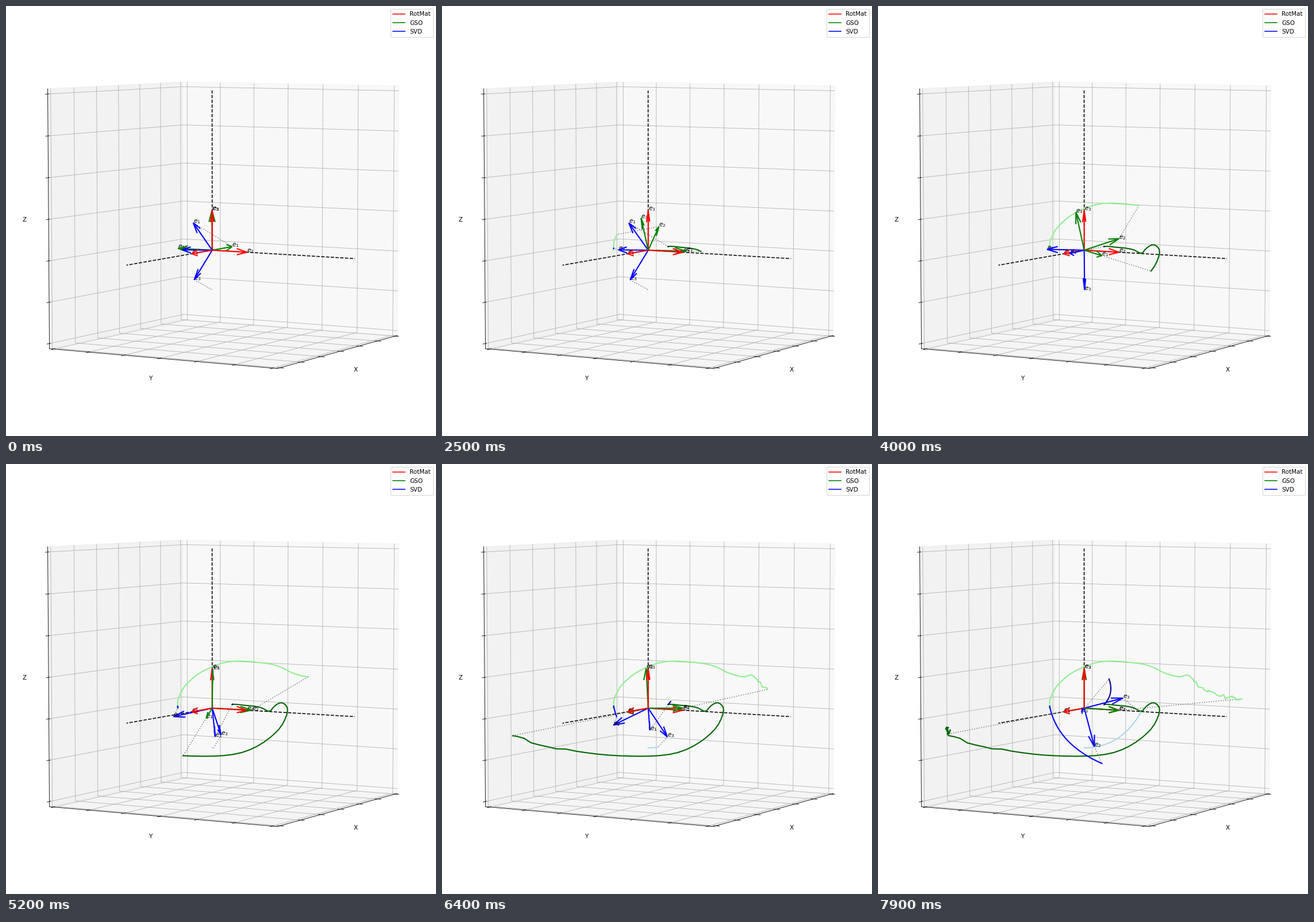
A matplotlib script that plays this animation: 748 by 748 pixels, repeating every 8000 ms.

```python
import numpy as np
import matplotlib.pyplot as plt
from matplotlib.animation import FuncAnimation
from matplotlib.lines import Line2D

SIZE, INCHES = 748, 10
FRAMES, INTERVAL = 80, 100
ELEV, AZIM = 5, 30
LOW, HIGH = -2.125, 4.125
STEPS = np.arange(FRAMES)

# Camera of the 3D axes: screen basis, scale and centre in pixels
el, az = np.radians([ELEV, AZIM])
RIGHT = np.array([-np.sin(az), np.cos(az), 0])
VIEW = np.array([np.cos(el) * np.cos(az), np.cos(el) * np.sin(az), np.sin(el)])
BASIS = np.column_stack([RIGHT, np.cross(VIEW, RIGHT), VIEW])
UNIT = 1.8294640721620434 * 25 / 24 / np.sqrt(3) / (HIGH - LOW)
SCALE = SIZE / 0.185 * UNIT
CX, CY = SIZE * 0.095 / 0.185, SIZE * 0.09 / 0.185
MID = BASIS.T @ np.full(3, (LOW + HIGH) / 2)


def to_world(x, y, depth):
    """World points seen at screen pixels (x, y), depth towards the viewer."""
    far = (10 + UNIT * (MID[2] - depth)) / SCALE
    local = np.array([MID[0] + (x - CX) * far, MID[1] + (CY - y) * far, depth])
    return (BASIS @ local).T


def glide(keys):
    """Cubic Hermite motion through rows of (time, values...), from rest."""
    keys = np.array(keys, float)
    t, p = keys[:, 0], keys[:, 1:]
    slope = np.gradient(p, t, axis=0)
    slope[0] = 0
    k = np.clip(np.searchsorted(t, STEPS, side="right") - 1, 0, len(t) - 2)
    h = (t[k + 1] - t[k])[:, None]
    s = (STEPS - t[k])[:, None] / h
    return ((1 + 2 * s) * (1 - s) ** 2 * p[k] + s * (1 - s) ** 2 * h * slope[k]
            + s * s * (3 - 2 * s) * p[k + 1] + s * s * (s - 1) * h * slope[k + 1])


def arc(start, bend, end):
    """Quadratic curve on screen, followed ever faster."""
    s = ((STEPS / STEPS[-1]) ** 9.3)[:, None]
    xy = ((1 - s) ** 2 * np.array(start) + 2 * s * (1 - s) * np.array(bend)
          + s * s * np.array(end))
    return to_world(*xy.T, np.zeros(FRAMES))


def shaken(motion, rng):
    """Add the jitter that sets in once the vectors have converged."""
    jitter = rng.uniform(-1, 1, (FRAMES, 2)) * (3, 4.5)
    x, y = (motion[:, :2] + jitter * np.clip((STEPS - 54) / 10, 0, 1)[:, None]).T
    return to_world(x, y, motion[:, 2])


def unit(v):
    return v / np.linalg.norm(v, axis=-1, keepdims=True)


def gram_schmidt(a, b):
    e1 = unit(a)
    e2 = unit(b - (b * e1).sum(axis=1, keepdims=True) * e1)
    return np.stack([e1, e2, np.cross(e1, e2)], axis=1)


def turned_axes(quaternions):
    """World axes (as rows) for quaternions given in screen space."""
    w, x, y, z = unit(quaternions).T
    m = np.array([
        [1 - 2 * (y * y + z * z), 2 * (x * y - w * z), 2 * (x * z + w * y)],
        [2 * (x * y + w * z), 1 - 2 * (x * x + z * z), 2 * (y * z - w * x)],
        [2 * (x * z - w * y), 2 * (y * z + w * x), 1 - 2 * (x * x + y * y)]])
    return np.einsum("ij,jkn->nki", BASIS, m)


# Raw vectors: time, screen x, screen y, depth
first = glide([
    (0, 393.3, 418.6, -0.863), (16, 411, 419.3, -0.69), (24, 445, 424.2, 0.25),
    (27, 460.3, 429.5, 0.85), (28, 464, 424.5, 1.05), (32, 480, 415.4, 1.97),
    (36, 489.8, 429, 2.7), (40, 475, 461, 3.25), (46, 410, 502, 4),
    (52, 308, 507.5, 4.45), (58, 199, 494, 4.9), (64, 124.5, 472, 5.24),
    (67, 121, 464, 5.24), (79, 123, 466, 5.24)])
second = glide([
    (0, 298.7, 421.6, -0.498), (16, 298.5, 421, -0.5), (24, 302.5, 401.5, -0.75),
    (28, 314, 383, -1), (32, 343, 360, -1.41), (36, 390, 343.6, -2.4),
    (40, 454, 347, -3.4), (46, 501, 364.5, -3.6), (52, 526, 370, -3.5),
    (56, 538, 367, -3.6), (64, 567, 392, -3.85), (71, 606, 404.5, -3.2),
    (79, 634, 406.5, -2.7)])
gso = gram_schmidt(to_world(*first.T), to_world(*second.T))
rng = np.random.default_rng(3)
gso_raw = [shaken(first, rng), shaken(second, rng)]

svd = turned_axes(glide([
    (0, 0.513, 0.039, -0.484, 0.705), (16, 0.513, 0.045, -0.486, 0.704),
    (32, 0.492, 0.125, -0.526, 0.690), (40, 0.387, 0.419, -0.595, 0.559),
    (52, 0.208, 0.698, -0.587, 0.330), (64, 0.182, 0.698, -0.501, 0.472),
    (79, -0.113, 0.677, 0.068, 0.723)]))
svd_raw = [
    arc((393.3, 418.4), (411, 400), (402, 374)),
    arc((298.7, 421.6), (312, 487), (389.5, 521)),
    arc((358.7, 493.7), (422, 493.7), (457.5, 432)),
]

fig = plt.figure(figsize=(INCHES, INCHES), dpi=SIZE / INCHES)
ax = fig.add_axes([0, 0, 1, 1], projection="3d")
ax.set_box_aspect((1, 1, 1))
ax.view_init(ELEV, AZIM)
for name in "xyz":
    ax.set(**{f"{name}lim": (LOW, HIGH), f"{name}ticks": range(-2, 5),
              f"{name}ticklabels": [], f"{name}label": name.upper()})

for axis in 4 * np.eye(3):
    ax.plot(*np.column_stack([np.zeros(3), axis]), "k--", lw=1.5)


def arrow(tip, color):
    return ax.quiver(0, 0, 0, *tip, color=color, lw=2, arrow_length_ratio=0.3)


def label(n, tip):
    return ax.text(*tip, f"$e_{n + 1}$")


for n, tip in enumerate(np.eye(3)):
    arrow(tip, "red")
    label(n, tip)


class Frame:
    """Moving axes with their labels, raw vectors and trails."""

    def __init__(self, axes, raw, color, trail_colors):
        self.axes, self.raw, self.color = axes, raw, color
        self.arrows = []
        self.labels = [label(n, tip) for n, tip in enumerate(axes[0])]
        self.links = [ax.plot([], [], [], ":", color="gray", lw=1.5)[0] for _ in raw]
        self.trails = [ax.plot([], [], [], color=c, lw=2)[0] for c in trail_colors]

    def show(self, i):
        tips = self.axes[i]
        for old in self.arrows:
            old.remove()
        self.arrows = [arrow(tip, self.color) for tip in tips]
        for text, tip in zip(self.labels, tips):
            text.set_position_3d(tip)
        for tip, raw, link, trail in zip(tips, self.raw, self.links, self.trails):
            link.set_data_3d(*np.column_stack([tip, raw[i]]))
            trail.set_data_3d(*raw[:i + 1].T)


frames = [
    Frame(gso, gso_raw, "green", ["darkgreen", "lightgreen"]),
    Frame(svd, svd_raw, "blue", ["darkblue", "blue", "lightblue"]),
]

ax.legend(handles=[Line2D([], [], color=c, label=s, lw=1.5) for c, s in
                   [("red", "RotMat"), ("green", "GSO"), ("blue", "SVD")]],
          loc="upper right")


def update(i):
    for frame in frames:
        frame.show(i)


anim = FuncAnimation(fig, update, frames=FRAMES, interval=INTERVAL, repeat=True)
plt.show()
```
